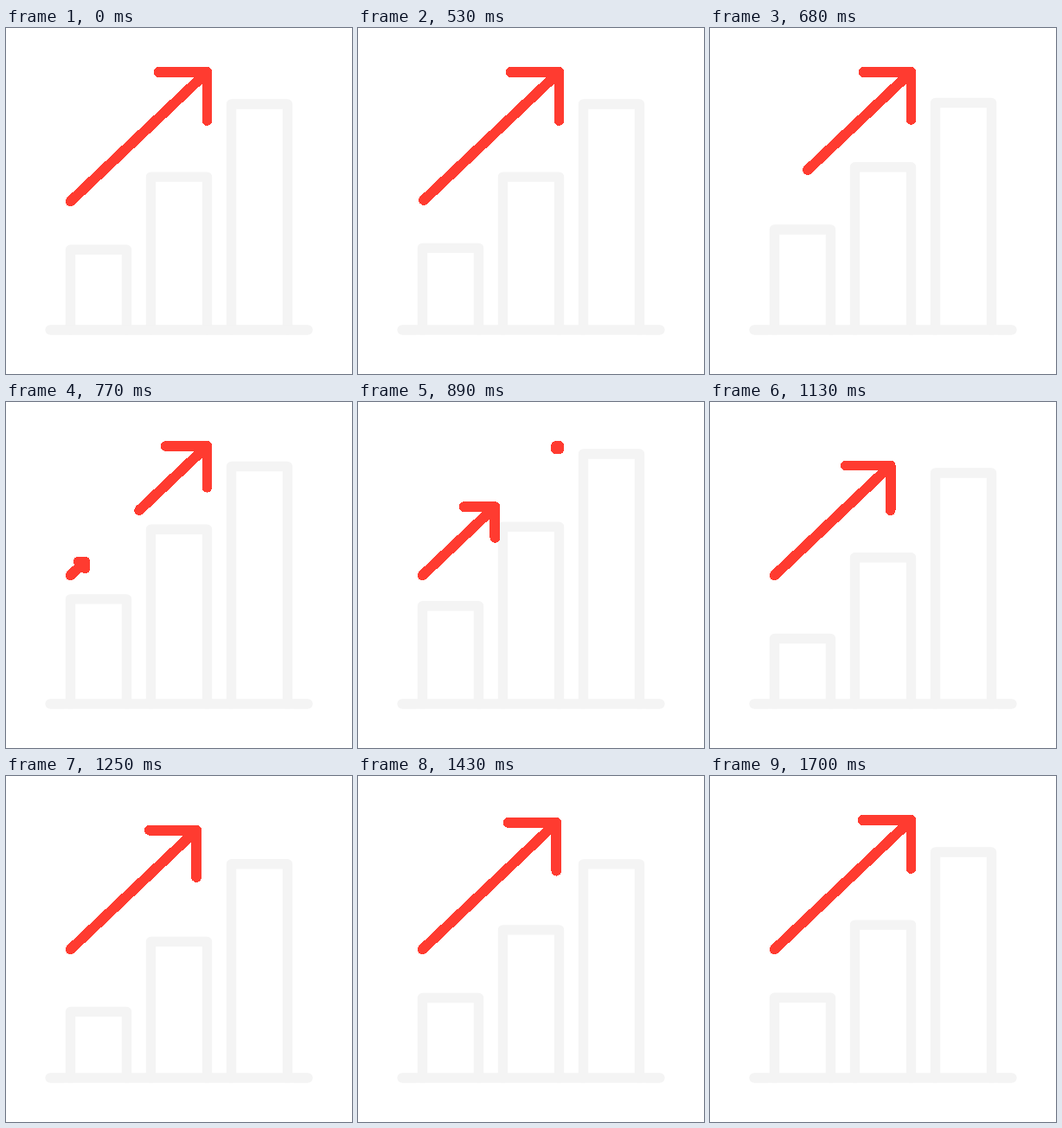
An HTML page that plays this animation: 400 by 400 pixels, repeating every 1730 ms.

```html
<!DOCTYPE html>
<html lang="en">
<head>
<meta charset="utf-8">
<title>Growth chart</title>
<style>
  html, body { margin: 0; width: 100%; height: 100%; overflow: hidden; background: #fff; }
  svg { display: block; width: 100vw; height: 100vh; }
  path { fill: none; stroke-linecap: round; stroke-linejoin: round; }
  .bar { stroke: #f4f4f4; stroke-width: 11.4; }
  .arrow { stroke: #ff3b30; stroke-width: 11.8; shape-rendering: crispEdges; }
</style>
</head>
<body>
<svg viewBox="0 0 400 400">
  <path class="bar"/>
  <path class="bar"/>
  <path class="bar"/>
  <path class="bar" d="M51 349H349"/>
  <path class="arrow"/>
  <path class="arrow"/>
</svg>
<script>
const LOOP = 1730, START = 530, STEP = 30;
const BAR_COUNT = 3, BAR_WIDTH = 65, FLOOR = 349, BAR_DELAY = 77;
const TAIL = [74.6, 200.4], TIP = [232.4, 51], ARM = 56;

const progress = (t, from, to) => Math.min(1, Math.max(0, (t - from) / (to - from)));

function smooth(t, from, to) {
  const p = progress(t, from, to);
  return p * p * (3 - 2 * p);
}

// Cubic Bezier easing with handles (x1, 0) and (x2, 1), solved by bisection.
function bezier(p, x1, x2) {
  let lo = 0, hi = 1;
  for (let i = 0; i < 24; i++) {
    const u = (lo + hi) / 2, w = 1 - u;
    const x = 3 * x1 * u * w * w + 3 * x2 * u * u * w + u * u * u;
    if (x < p) lo = u; else hi = u;
  }
  return lo * lo * (3 - 2 * lo);
}

// Bars stretch up, dip below their resting height, then settle.
const sway = t =>
  -28.3 * smooth(t, 490, 750) + 47.8 * smooth(t, 790, 1180) - 19.5 * smooth(t, 1180, 1450);

function barPath(i, t) {
  const x = 74.5 + 93 * i;
  const top = 256.2 - 84.1 * i + sway(t - BAR_DELAY * i);
  return `M${x} ${FLOOR}V${top}H${x + BAR_WIDTH}V${FLOOR}`;
}

const along = p => TAIL.map((v, i) => v + (TIP[i] - v) * p);

function arrowPath(from, to, arm) {
  const [x, y] = along(to);
  return `M${along(from)}L${x} ${y}M${x - arm} ${y}H${x}V${y + arm}`;
}

function leavingArrow(t) {
  const p = progress(t, 500, 895);
  return p < 1 ? arrowPath(p ** 1.8, 1, ARM * (1 - p ** 5)) : '';
}

function growingArrow(t) {
  const p = progress(t, 712, 1642);
  const grown = bezier(p, 0.14, 0);
  return p > 0 ? arrowPath(0, grown, ARM * (1 - (1 - grown) ** 1.35)) : '';
}

const bars = document.querySelectorAll('.bar');
const [oldArrow, newArrow] = document.querySelectorAll('.arrow');

function draw(t) {
  for (let i = 0; i < BAR_COUNT; i++) bars[i].setAttribute('d', barPath(i, t));
  oldArrow.setAttribute('d', leavingArrow(t));
  newArrow.setAttribute('d', growingArrow(t));
}

function frame() {
  const t = performance.now() % LOOP;
  draw(t < START ? 0 : START + Math.floor((t - START) / STEP) * STEP);
  requestAnimationFrame(frame);
}
frame();
</script>
</body>
</html>
```
